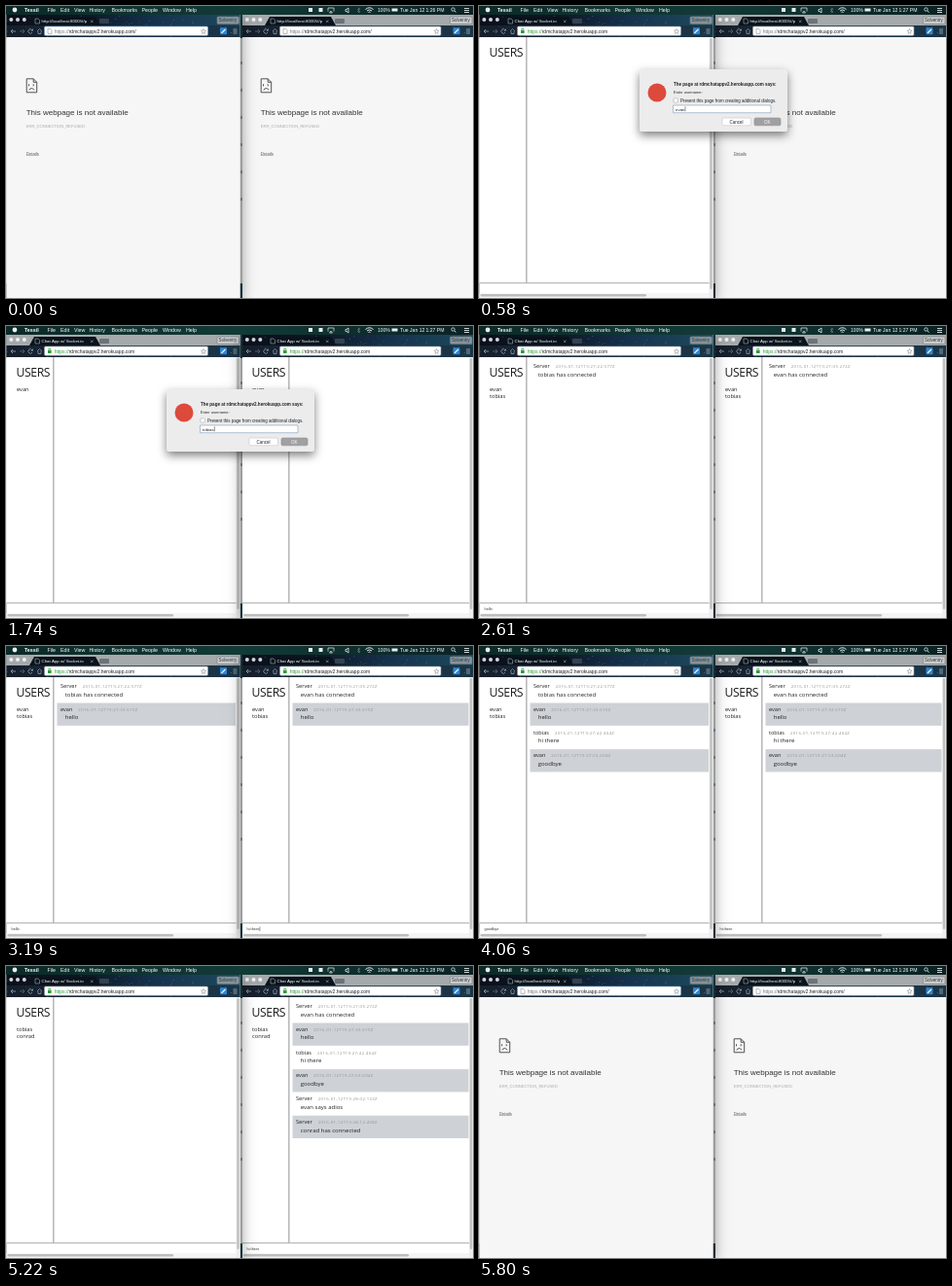
Recreate the animation shown at these times as an HTML page with a canvas. Size 480 by 300 pixels, loop 8000 ms.

```html
<!DOCTYPE html>
<html lang="en">
<head>
<meta charset="utf-8">
<title>Chat in two windows</title>
<style>
  html, body { margin: 0; width: 100%; height: 100%; overflow: hidden; background: #10282b; }
  canvas { display: block; width: 480px; height: 300px; }
</style>
</head>
<body>
<canvas id="stage" width="480" height="300"></canvas>
<script>
const ctx = document.getElementById('stage').getContext('2d');
const STEP = 290, LOOP = 8000, LAST = 20;
const SANS = '"Liberation Sans", Arial, sans-serif';
const CHAT = '"Open Sans", "Noto Sans", sans-serif';
const HOST = 'rdmchatappv2.herokuapp.com';
const [FIRST, SECOND, THIRD] = ['evan', 'tobias', 'conrad'];

// x anchors parts on the left side of a window, rx those on its right side.
const LEFT = { start: 0.5, end: 240.5, x: 0, rx: 0, errorX: 20.7 };
const RIGHT = { start: 243, end: 480, x: 242, rx: 239.5, errorX: 261.7 };
const TOP = 32;

function rect(x, y, w, h, fill) {
  ctx.fillStyle = fill;
  ctx.fillRect(x, y, w, h);
}

function box(x, y, w, h, r, fill, stroke) {
  ctx.beginPath();
  ctx.roundRect(x, y, w, h, r);
  ctx.fillStyle = fill;
  ctx.fill();
  if (stroke) line(stroke, 0.6);
}

function line(color, width) {
  ctx.strokeStyle = color;
  ctx.lineWidth = width;
  ctx.stroke();
}

function path(d, color, width = 0.8, x = 0, y = 0) {
  ctx.save();
  ctx.translate(x, y);
  ctx.strokeStyle = color;
  ctx.lineWidth = width;
  ctx.stroke(new Path2D(d));
  ctx.restore();
}

function dot(x, y, r, fill) {
  ctx.beginPath();
  ctx.arc(x, y, r, 0, 7);
  ctx.fillStyle = fill;
  ctx.fill();
}

// Returns the x where the text ends.
function text(str, x, y, size, color, family = SANS, weight = 400, spacing = 0) {
  ctx.font = `${weight} ${size}px ${family}`;
  ctx.letterSpacing = spacing + 'px';
  ctx.fillStyle = color;
  ctx.fillText(str, x, y);
  return x + ctx.measureText(str).width;
}

function gradient(x0, x1, ...colors) {
  const g = ctx.createLinearGradient(x0, 0, x1, 0);
  colors.forEach((c, i) => g.addColorStop(i / (colors.length - 1), c));
  return g;
}

function stars(x, y, w, h, count) {
  const noise = n => Math.abs(Math.sin(n * 127.1) * 43758.5) % 1;
  for (let i = 1; i <= count; i++) {
    rect(x + noise(i) * w, y + noise(i + 50) * h, 0.8, 0.8, `rgba(150,195,225,${0.2 + noise(i + 90) * 0.4})`);
  }
}

function drawDesktop() {
  rect(0, 0, 480, 300, '#173a45');
  rect(0, 33, 480, 252, '#c4c6c7');
  for (let y = 57; y < 200; y += 28) rect(241, y, 2, 3, '#8b9296');
}

function drawMenuBar(clock) {
  rect(0, 0, 480, 9, gradient(0, 480, '#0b2a28', '#123a37', '#0a2224'));
  dot(9, 4, 2.4, '#eee');
  text('Tessil', 19, 6, 5.3, '#fff', SANS, 700);
  const items = { File: 42.5, Edit: 56, View: 70, History: 85.5, Bookmarks: 108.5, People: 139.5, Window: 161, Help: 185 };
  for (const [label, x] of Object.entries(items)) text(label, x, 6, 5.3, '#fff');

  rect(311, 2, 4, 4, '#eee');
  rect(321.5, 2, 4, 4, '#eee');
  path('M0 3.5V0H6V3.5M1.5 5L3 3L4.5 5Z', '#eee', 0.7, 331, 2);
  path('M0 1.5H1L3 0V5L1 3.5H0Z', '#eee', 0.8, 349, 2);
  path('M0 1L3 4L1.5 5V0L3 1L0 4', '#70807f', 0.6, 361, 2);
  path('M0 2Q4 -1.5 8 2M1.5 3.5Q4 1.3 6.5 3.5M3 5Q4 4 5 5', '#fff', 0.9, 369.5, 1.5);
  text('100%', 382, 6, 5, '#fff');
  rect(396.5, 2.5, 6, 3, '#eee');
  text('Tue Jan 12', 405, 6, 5.1, '#fff');
  text(clock + ' PM', 431.5, 6, 5.1, '#fff');
  ctx.beginPath();
  ctx.arc(459.5, 3.5, 1.7, 0, 7);
  line('#fff', 0.7);
  path('M461 5L462.5 6.5M471 2.5H476M471 4.5H476M471 6.5H476', '#fff');
}

function drawTabStrip({ start, end, x, rx }, active, loaded) {
  const width = end - start;
  rect(start, 9, width, 11, active ? gradient(start, end, '#0b0f1a', '#0d1826', '#163450', '#1d4a5c') : '#a6a9ab');
  if (active) stars(start, 9, width, 11, 45);
  ctx.fillStyle = '#0a131c';
  ctx.fill(new Path2D(`M${x + 24} 20L${x + 29} 11H${x + 92}L${x + 97} 20Z`));
  for (const cx of [5.3, 12, 18.8]) dot(Math.max(x, start - 0.5) + cx, 14, 2, active ? '#d3d8da' : '#eeefef');
  path('M0 0H3L4.5 1.5V5H0Z', '#9fabb2', 0.6, x + 30, 13);
  text(loaded ? 'Chat App w/ Socket.io' : 'http://localhost:8000/#/p', x + 36.5, 17, 4.4, '#fff');
  path('M0 0L2.5 2.5M2.5 0L0 2.5', '#9eabb2', 0.6, x + 87, 14.5);
  box(x + 96, 13, 10, 5, 1, active ? '#33424c' : '#6d7478');
  box(rx + 217, 11, 22.5, 7.5, 1, active ? '#87949c' : '#c9cbcc', '#6f7a80');
  text('Solventry', rx + 218.5, 16.4, 4.5, '#30383d');
}

function drawToolbar({ start, end, x, rx }, active, loaded, caret) {
  rect(start, 20, end - start, TOP - 20, gradient(start, end, '#151e2b', '#1c3044', '#1a3547'));
  stars(start, 20, end - start, TOP - 20, 45);
  path('M5 0H0M2 -2L0 0L2 2', '#8d9aa3', 0.9, x + 5, 26);
  path('M0 0H5M3 -2L5 0L3 2', '#56646d', 0.9, x + 14, 26);
  path('M4 -1A2.2 2.2 0 1 0 4 1M4.5 -2.5V-.7H2.7', '#8d9aa3', 0.8, x + 23, 26);
  path('M0 0L2.5 -2.5L5 0M1 0V2.5H4V0', '#8d9aa3', 0.8, x + 32, 26);

  box(x + 39.5, 21, rx - x + 168, 9.3, 1.2, '#fff', active && !loaded ? '#6fa8dc' : '#8f9ca3');
  let cursor;
  if (loaded) {
    rect(x + 43, 25, 3.6, 3, '#2b9a3b');
    path('M0 2V0H2V2', '#2b9a3b', 0.7, x + 43.8, 23.4);
    cursor = text('https://', x + 49.7, 27.5, 5, '#2b9a3b');
    text(HOST, cursor, 27.5, 5, '#222');
  } else {
    path('M0 0H2.5L4 1.5V5H0Z', '#8a8a8a', 0.6, x + 43, 23.3);
    cursor = text('https://', x + 49.7, 27.5, 5, '#777');
    cursor = text(HOST + '/', cursor, 27.5, 5, '#222');
    if (caret) rect(cursor + 0.3, 23, 0.7, 6, '#111');
  }
  path('M0 -2.5L.7 -.8L2.5 -.7L1.1 .5L1.5 2.4L0 1.4L-1.5 2.4L-1.1 .5L-2.5 -.7L-.7 -.8Z', '#8a8f92', 0.6, rx + 203, 26);
  box(rx + 220, 22.3, 7, 7, 0.8, '#2f86d3');
  path('M0 4L4 0', '#fff', 1.2, rx + 221.5, 23.8);
  path('M0 0H4M0 2H4M0 4H4', '#a9b4ba', 0.8, rx + 233.5, 24);
}

function drawError({ start, end, errorX: x }) {
  rect(start, TOP, end - start, 300 - TOP, '#f6f6f6');
  path('M.5 .5H7.5L11 4V14.5H.5ZM7.5 .5V4H11M2.8 6V8M7.5 6V8M3 12Q5.5 8.5 8.5 12', '#505050', 1, x, 74.3);
  text('This webpage is not available', x, 112.2, 8, '#333');
  text('ERR_CONNECTION_REFUSED', x, 125.3, 4.1, '#aaa');
  text('Details', x, 152.5, 4.3, '#555');
  rect(x, 153.1, 13, 0.5, '#777');
}

function drawMessage({ x, rx }, index, [name, stamp, body]) {
  const y = 43 + index * 23.8;
  if (index % 2) rect(x + 52.5, y - 8.3, rx - x + 183.5, 23.3, '#ced2d7');
  const end = text(name, x + 56, y, 5.6, '#222', CHAT);
  text(`2016-01-12T19:${stamp}Z`, end + 6, y, 4.3, '#929292', CHAT, 400, 0.35);
  text(body, x + 60.7, y + 8.5, 6, '#222', CHAT);
}

function drawChat(win, { users, messages, input, caret }) {
  const { start, end, x } = win;
  const width = end - start;
  rect(start, TOP, width, 300 - TOP, '#fff');
  messages.forEach((m, i) => drawMessage(win, i, m));
  text('USERS', x + 10.5, 52.2, 12.2, '#1a1a1a', CHAT, 500, -0.4);
  users.forEach((name, i) => text(name, x + 11, 67 + i * 7.2, 5.7, '#222', CHAT));
  rect(x + 48.5, TOP, 0.8, 284.3 - TOP, '#777');
  rect(start, 284.3, width - 3.5, 0.8, '#999');
  const inputEnd = text(input, x + 5.5, 292, 3.9, '#333');
  if (caret) rect(inputEnd + 0.2, 288.5, 0.5, 4.5, '#222');
  rect(start, 295, width - 3.5, 5, '#f4f4f4');
  box(start + 1, 296, x + 171 - start, 2.6, 1.3, '#bdbdbd');
  rect(end - 4, TOP, 4, 300 - TOP, '#eee');
  box(end - 3.2, TOP + 1, 2.4, 258, 1.2, '#c0c0c0');
}

function drawWindow(win, active, page, caret) {
  ctx.save();
  if (active) {
    ctx.shadowColor = 'rgba(0,0,0,.45)';
    ctx.shadowBlur = 14;
    ctx.shadowOffsetY = 4;
  }
  rect(win.start, 9, win.end - win.start, 291, '#f6f6f6');
  ctx.restore();
  drawTabStrip(win, active, page);
  drawToolbar(win, active, page, caret);
  if (page) drawChat(win, page);
  else drawError(win);
}

function drawDialog(value) {
  ctx.save();
  ctx.shadowColor = 'rgba(0,0,0,.5)';
  ctx.shadowBlur = 10;
  ctx.shadowOffsetY = 4;
  box(165, 65, 152, 64, 2, '#ececec');
  ctx.restore();
  dot(183, 89, 9.5, '#dc4a3c');
  text(`The page at ${HOST} says:`, 200, 81.7, 4.55, '#222', SANS, 700);
  text('Enter username:', 200, 89.8, 4, '#222');
  box(200, 94.8, 4.4, 4.4, 0.8, '#fff', '#aaa');
  text('Prevent this page from creating additional dialogs.', 207, 98.8, 4.45, '#222');
  box(199.5, 102, 100.5, 7.7, 0, '#fff', '#7f9cb8');
  const end = text(value, 202, 107.5, 4.4, '#222');
  rect(end + 0.2, 103.3, 0.5, 5, '#222');
  box(250, 115, 29.5, 7.8, 1.5, '#fff', '#c4c4c4');
  text('Cancel', 257.5, 120.6, 4.5, '#222');
  box(283, 115, 27, 7.8, 1.5, '#a0a0a3', '#8e8e91');
  text('OK', 293, 120.6, 4.5, '#fff');
}

function conversation(step, greeting) {
  return [
    [7, 'Server', ...greeting],
    [10, FIRST, '27:33.615', 'hello'],
    [12, SECOND, '27:42.404', 'hi there'],
    [14, FIRST, '27:53.604', 'goodbye'],
    [15, 'Server', '28:02.133', `${FIRST} says adios`],
    [17, 'Server', '28:12.408', `${THIRD} has connected`]
  ].filter(([from]) => step >= from).map(([, ...message]) => message);
}

function usersAt(step) {
  if (step < 3) return [];
  if (step < 7) return [FIRST];
  if (step < 15) return [FIRST, SECOND];
  return step < 17 ? [SECOND] : [SECOND, THIRD];
}

function draw(step) {
  const between = (from, to) => step >= from && step < to;
  const rightActive = between(4, 8) || between(11, 13);
  const users = usersAt(step);
  const leftPage = step >= 1 && {
    users,
    messages: step < 15 ? conversation(step, ['27:22.577', `${SECOND} has connected`]) : [],
    input: between(9, 13) ? 'hello' : between(13, 15) ? 'goodbye' : ''
  };
  const rightPage = step >= 5 && {
    users,
    messages: conversation(step, ['27:05.272', `${FIRST} has connected`]),
    input: step >= 11 ? 'hi there' : '',
    caret: step === 11
  };

  drawDesktop();
  const windows = [
    () => drawWindow(LEFT, !rightActive, leftPage),
    () => drawWindow(RIGHT, rightActive, rightPage, rightActive)
  ];
  if (!rightActive) windows.reverse();
  windows.forEach(paint => paint());
  drawMenuBar(step < 1 ? '1:26' : step < 15 ? '1:27' : '1:28');

  const prompts = { 1: '', 2: FIRST, 5: '', 6: SECOND, 15: '', 16: THIRD };
  if (step in prompts) drawDialog(prompts[step]);
}

function tick() {
  const step = Math.floor(performance.now() % LOOP / STEP);
  draw(step < LAST ? step : 0);
  requestAnimationFrame(tick);
}
tick();
</script>
</body>
</html>
```
